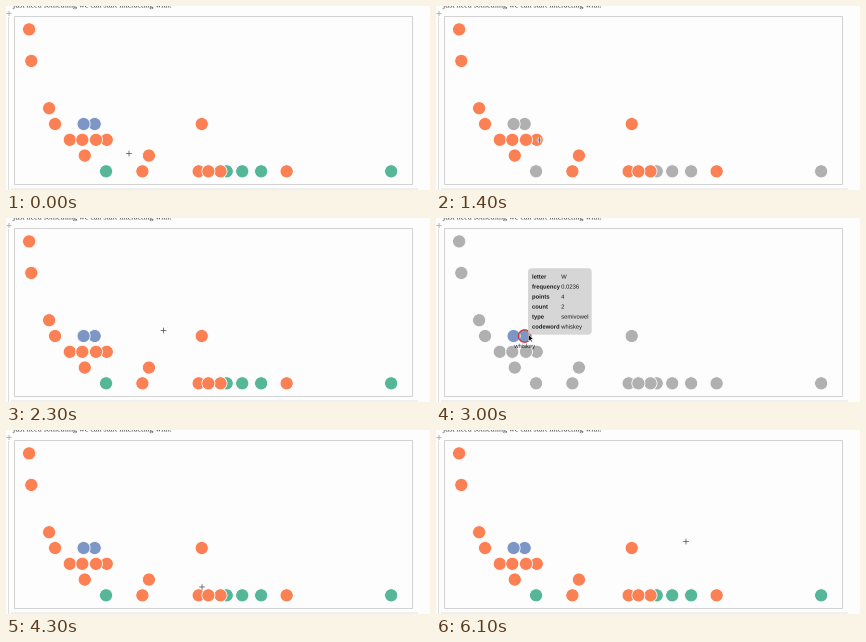
A matplotlib script that plays this animation: 424x184 px, repeating every 6.2 s.

```python
import numpy as np
import matplotlib.pyplot as plt
from matplotlib.animation import FuncAnimation
from matplotlib.patches import Circle, FancyBboxPatch, PathPatch, Polygon, Rectangle
from matplotlib.textpath import TextPath
from matplotlib.transforms import Affine2D

W, H, DPI = 424, 184, 100
FRAMES, STEP = 62, 100
PT = 72 / DPI  # points per pixel

COLORS = {"vowel": "#56b698", "consonant": "#fb8053", "semivowel": "#7c96c6"}
DIMMED = "#b0b0b0"

# letter: (frequency, points)
LETTERS = {
    "A": (0.08167, 1), "B": (0.01492, 3), "C": (0.02782, 3), "D": (0.04253, 2),
    "E": (0.12702, 1), "G": (0.02015, 2), "H": (0.06094, 4), "I": (0.06966, 1),
    "J": (0.00153, 8), "K": (0.00772, 5), "L": (0.04025, 1), "M": (0.02406, 3),
    "N": (0.06749, 1), "O": (0.07507, 1), "P": (0.01929, 3), "Q": (0.00095, 10),
    "R": (0.05987, 1), "S": (0.06327, 1), "T": (0.09056, 1), "U": (0.02758, 1),
    "V": (0.00978, 4), "W": (0.0236, 4), "X": (0.0015, 8), "Y": (0.01974, 4),
    "Z": (0.00074, 10),
}

# letter: (count, codeword, tooltip start ms, tooltip end ms)
TIPS = {
    "C": (2, "charlie", 1500, 2100),
    "W": (2, "whiskey", 2800, 3900),
    "A": (9, "alpha", 5200, 5800),
}

# cursor path: (ms, x, y)
PATH = np.array([
    (0, 123, 147.5), (600, 103.5, 134), (2000, 103.5, 134), (2300, 157.5, 112.5),
    (2600, 125, 114), (2800, 92.5, 116.5), (3800, 92.5, 116.5),
    (4300, 196, 157), (4400, 200, 161), (4600, 212, 161), (4700, 218, 155),
    (5000, 246, 156), (5200, 256.5, 165.5), (5700, 256.5, 165.5), (6100, 250, 111.5),
])


def kind(letter):
    if letter in "AEIOU":
        return "vowel"
    return "semivowel" if letter in "WY" else "consonant"


def place(letter):
    freq, points = LETTERS[letter]
    return 21 + 2867 * freq, 181.1 - 15.77 * points


def cursor(t):
    return np.interp(t, PATH[:, 0], PATH[:, 1]), np.interp(t, PATH[:, 0], PATH[:, 2])


fig = plt.figure(figsize=(W / DPI, H / DPI), dpi=DPI, facecolor="#fdfdfd")
ax = fig.add_axes([0, 0, 1, 1])
ax.set_xlim(0, W)
ax.set_ylim(H, 0)
ax.axis("off")


def write(x, y, s, size=5.85, font="Liberation Sans", weight="normal",
          color="#1a1a1a", center=False, z=1):
    """Unhinted text with its baseline at y; returns the patch and its right edge."""
    path = TextPath((0, 0), s, size=size, prop={"family": font, "weight": weight})
    width = path.get_extents().x1
    if center:
        x -= width / 2
    flip = Affine2D().scale(1, -1).translate(x, y)
    patch = PathPatch(flip.transform_path(path), fc=color, ec="none", zorder=z, snap=False)
    return ax.add_patch(patch), x + width


def line(xs, ys, color, width=1, z=1):
    return ax.plot(xs, ys, color=color, lw=width * PT, zorder=z, snap=False,
                   solid_capstyle="butt")[0]


# page around the chart
write(7, 1.4, "just need something we can start interacting with.", 8,
      "Liberation Serif", color="#333333")
line([2.5, 2.5], [11, H], "#dddddd")
line([0.5, 5.5], [7.5, 7.5], "#b5b5b5")
line([3, 3], [5, 10], "#b5b5b5")
ax.add_patch(Rectangle((5, 181.5), 407, 3, fc="#efefef", ec="none"))
ax.add_patch(Rectangle((8.5, 10.5), 398, 168, fc="none", ec="#d2d2d2", lw=PT, snap=False))

dots = {}
for i, letter in enumerate(LETTERS):
    dots[letter] = ax.add_patch(
        Circle(place(letter), 6.55, ec="white", lw=0.8 * PT, zorder=2 + i / 100))


def make_tip(letter):
    """Ring, codeword label and tooltip box for one letter."""
    count, word, start, _ = TIPS[letter]
    freq, points = LETTERS[letter]
    px, py = place(letter)
    x, y = cursor(start)
    left, top = x - 0.5, y - 66.3
    parts = [
        ax.add_patch(Circle((px, py), 6.2, fc="none", ec="#cf302c", lw=1.2 * PT, zorder=4)),
        write(px, py + 12, word, center=True, z=4)[0],
    ]
    rows = {"letter": letter, "frequency": freq, "points": points,
            "count": count, "type": kind(letter), "codeword": word}
    right = 0
    for i, (key, value) in enumerate(rows.items()):
        base = top + 10.4 + 10 * i
        name, _ = write(left + 4, base, key, weight="bold", z=6)
        cell, end = write(left + 33.2, base, str(value), z=6)
        parts += [name, cell]
        right = max(right, end)
    parts.append(ax.add_patch(FancyBboxPatch(
        (left, top), right + 3.6 - left, 66.5, boxstyle="round,pad=0,rounding_size=4",
        fc="#d5d5d5", ec="none", alpha=0.96, zorder=5)))
    return parts


tips = {letter: make_tip(letter) for letter in TIPS}

ARROW = np.array([(0, 0), (0, 6.6), (1.6, 5.2), (2.7, 7.6), (3.8, 7.1),
                  (2.8, 4.8), (4.8, 4.6)])
arrow = ax.add_patch(Polygon(ARROW, fc="black", ec="white", lw=0.5 * PT, zorder=8))
# dark crosshair on a white halo
cross = [(line([], [], "white", 2.2, 8), line([], [], "white", 2.2, 8)),
         (line([], [], "#555555", 0.8, 9), line([], [], "#555555", 0.8, 9))]


def hovered(x, y):
    """Topmost letter under the cursor, if any."""
    for letter in reversed(list(LETTERS)):
        px, py = place(letter)
        if np.hypot(x - px, y - py) < 6:
            return letter
    return None


def draw(n):
    t = n * STEP
    x, y = cursor(t)
    over = hovered(x, y)
    for letter, dot in dots.items():
        lit = over is None or kind(letter) == kind(over)
        dot.set_facecolor(COLORS[kind(letter)] if lit else DIMMED)

    pointing = False
    for letter, parts in tips.items():
        on = TIPS[letter][2] <= t < TIPS[letter][3]
        pointing |= on
        for part in parts:
            part.set_visible(on)

    arrow.set_visible(pointing)
    arrow.set_xy(ARROW + (x, y))
    for across, down in cross:
        across.set_data([x - 2.8, x + 2.8], [y, y])
        down.set_data([x, x], [y - 2.8, y + 2.8])
        across.set_visible(not pointing)
        down.set_visible(not pointing)
    return []


anim = FuncAnimation(fig, draw, frames=FRAMES, interval=STEP, repeat=True,
                     repeat_delay=0, blit=False)
plt.show()
```
